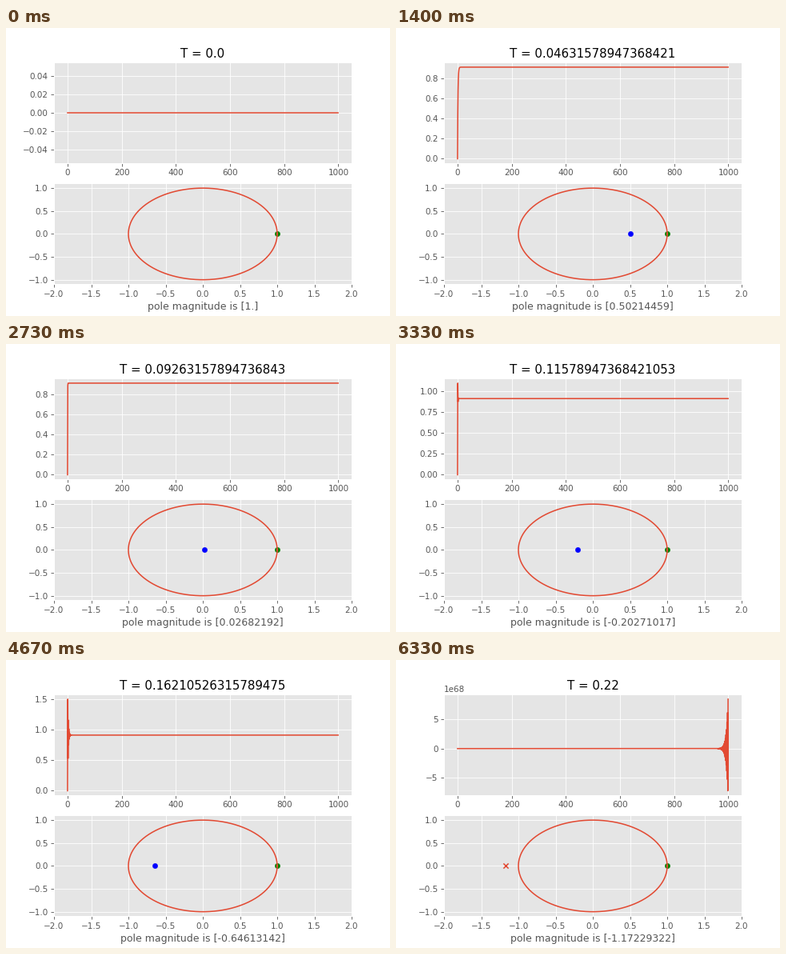
These frames come from a looping animation (480 by 360 pixels, 6.67 s). A matplotlib script:

```python
import numpy as np
import matplotlib.pyplot as plt
from matplotlib.animation import FuncAnimation

plt.style.use("ggplot")

FRAMES, INTERVAL = 145, 46      # 6670 ms per loop
HOLD = 1000 / 3                 # ms each sampling period stays on screen
GAIN = 10
PERIODS = np.linspace(0, 0.22, 20)
steps = np.arange(1000)

fig, (ax_resp, ax_pole) = plt.subplots(2, 1, figsize=(6.4, 4.8), dpi=75)

response, = ax_resp.plot(steps, np.zeros(len(steps)))
title = ax_resp.set_title("")

angle = np.linspace(0, 2 * np.pi, 400)
ax_pole.plot(np.cos(angle), np.sin(angle))
ax_pole.scatter([1], [0], color="g")
stable = ax_pole.scatter([0], [0], color="b")
unstable = ax_pole.scatter([0], [0], marker="x", color="C0")
ax_pole.set_xlim(-2, 2)
ax_pole.set_ylim(-1.1, 1.1)


def update(frame):
    elapsed = INTERVAL * (frame + 1) - 1
    period = PERIODS[min(int(elapsed / HOLD), len(PERIODS) - 1)]

    # Zero-order hold of GAIN / (s + 1) under unit feedback
    pole = (1 + GAIN) * np.exp(-period) - GAIN
    response.set_ydata(GAIN / (1 + GAIN) * (1 - pole ** steps))
    ax_resp.relim()
    ax_resp.autoscale_view()
    title.set_text(f"T = {float(period)}")

    for marker, shown in ((stable, abs(pole) < 1), (unstable, abs(pole) > 1)):
        marker.set_offsets([[pole, 0]])
        marker.set_visible(bool(shown))
    ax_pole.set_xlabel(f"pole magnitude is {np.array([pole])}")
    return response, title, stable, unstable


anim = FuncAnimation(fig, update, frames=FRAMES, interval=INTERVAL,
                     init_func=lambda: update(0), repeat=True,
                     repeat_delay=0, blit=False)
plt.show()
```
